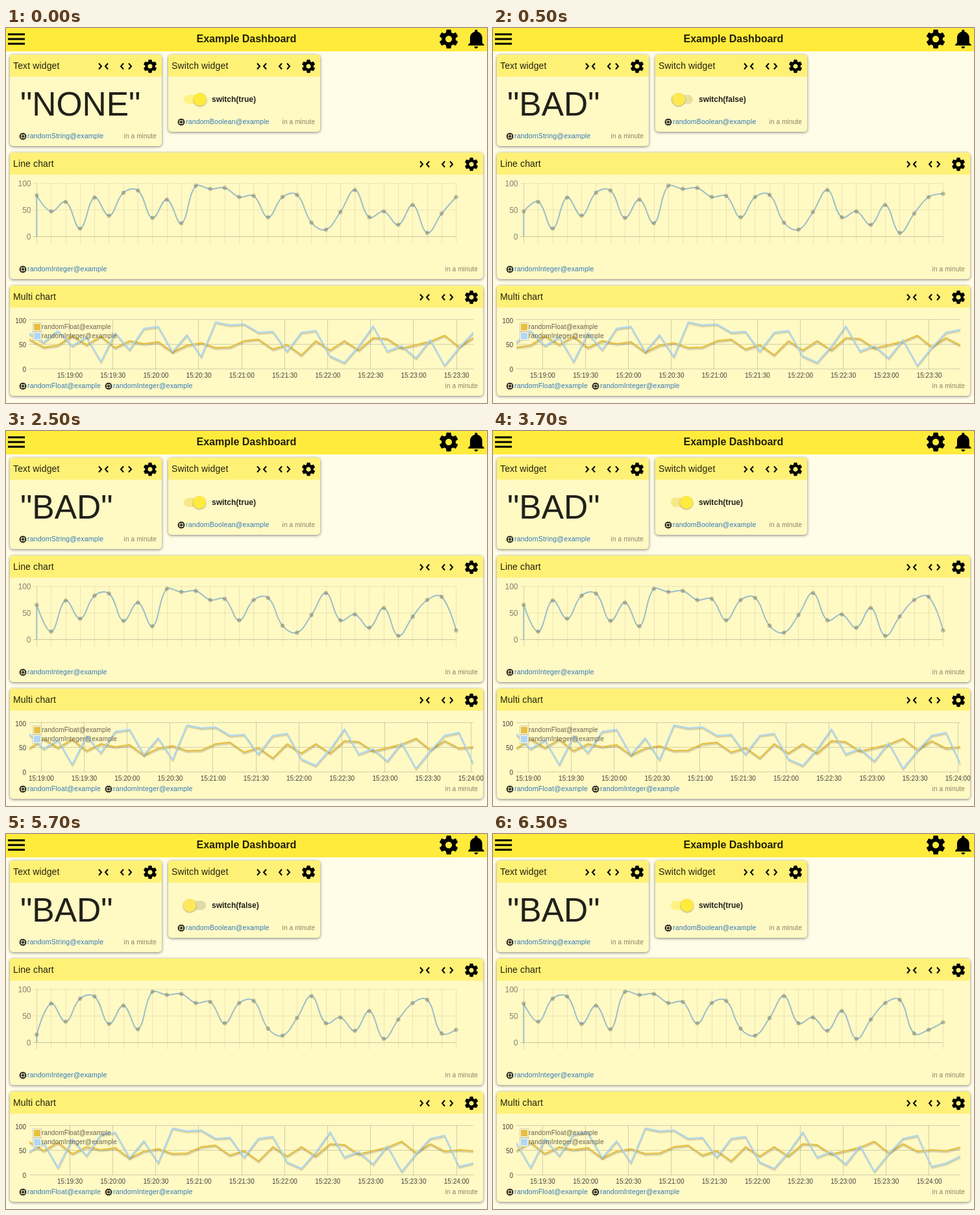
Recreate the animation shown at these times as an HTML page. Size 741 by 578 pixels, loop 8 s.

```html
<!DOCTYPE html>
<html lang="en">
<head>
<meta charset="utf-8">
<title>Example Dashboard</title>
<style>
html, body { margin: 0; width: 100%; height: 100%; overflow: hidden; background: #fffde7; }
svg { display: block; }
text { font: 14px "Liberation Sans", Arial, sans-serif; letter-spacing: .14px; fill: rgba(0,0,0,.87); white-space: pre; }
.card { filter: drop-shadow(0 1px 2px rgba(0,0,0,.5)); }
.bar { font-size: 16px; font-weight: bold; letter-spacing: 0; }
.big { font-size: 51.5px; letter-spacing: 0; }
.label { font-size: 12px; font-weight: bold; letter-spacing: 0; }
.link { font-size: 10.6px; fill: #337ab7; }
.ago { font-size: 10px; fill: rgba(0,0,0,.48); text-anchor: end; }
.scale { font-size: 12px; letter-spacing: 0; fill: #86836f; text-anchor: end; }
.tick { font-size: 10px; letter-spacing: 0; fill: #45433a; }
.legend { font-size: 10px; fill: #65624f; }
.thumb { filter: drop-shadow(0 1px 1px rgba(0,0,0,.35)); }
.line { fill: none; stroke-linejoin: round; }
</style>
</head>
<body>
<svg width="741" height="578" viewBox="0 0 741 578">
  <defs>
    <path id="menu" d="M3 18h18v-2H3zM3 13h18v-2H3zM3 6v2h18V6z"/>
    <path id="bell" d="M11.5 22c1.1 0 2-.9 2-2h-4c0 1.1.9 2 2 2zm6.5-6v-5.5c0-3.07-2.13-5.64-5-6.32V3.5c0-.83-.67-1.5-1.5-1.5S10 2.67 10 3.5v.68c-2.87.68-5 3.25-5 6.32V16l-2 2v1h17v-1z"/>
    <path id="gear" d="M19.43 12.98c.04-.32.07-.64.07-.98s-.03-.66-.07-.98l2.11-1.65c.19-.15.24-.42.12-.64l-2-3.46c-.12-.22-.39-.3-.61-.22l-2.49 1c-.52-.4-1.08-.73-1.69-.98l-.38-2.65C14.46 2.18 14.25 2 14 2h-4c-.25 0-.46.18-.49.42l-.38 2.65c-.61.25-1.17.59-1.69.98l-2.49-1c-.23-.09-.49 0-.61.22l-2 3.46c-.13.22-.07.49.12.64l2.11 1.65c-.04.32-.07.65-.07.98s.03.66.07.98l-2.11 1.65c-.19.15-.24.42-.12.64l2 3.46c.12.22.39.3.61.22l2.49-1c.52.4 1.08.73 1.69.98l.38 2.65c.03.24.24.42.49.42h4c.25 0 .46-.18.49-.42l.38-2.65c.61-.25 1.17-.59 1.69-.98l2.49 1c.23.09.49 0 .61-.22l2-3.46c.12-.22.07-.49-.12-.64zM12 15.5c-1.93 0-3.5-1.57-3.5-3.5s1.57-3.5 3.5-3.5 3.5 1.57 3.5 3.5-1.57 3.5-3.5 3.5z"/>
    <path id="chip" d="M15 9H9v6h6zm-2 4h-2v-2h2zm8-2V9h-2V7c0-1.1-.9-2-2-2h-2V3h-2v2h-2V3H9v2H7c-1.1 0-2 .9-2 2v2H3v2h2v2H3v2h2v2c0 1.1.9 2 2 2h2v2h2v-2h2v2h2v-2h2c1.1 0 2-.9 2-2v-2h2v-2h-2v-2zm-4 6H7V7h10z"/>
    <path id="arrows" d="M-97 -4.5l4 4.5l-4 4.5M-83 -4.5l-4 4.5l4 4.5M-59 -4.5l-4 4.5l4 4.5M-51 -4.5l4 4.5l-4 4.5" fill="none" stroke="#000" stroke-width="2"/>
  </defs>
  <g id="fixed"></g>
  <g id="live"></g>
</svg>
<script>
const ints = [72, 54, 77, 47, 65, 15, 73, 39, 82, 86, 35, 69, 25, 95, 89, 91, 74, 76, 36, 74, 78,
  26, 13, 46, 87, 36, 47, 22, 59, 7, 43, 74, 80, 17, 24, 38];
const floats = [60, 44, 48, 67, 49, 66, 43, 57, 51, 55, 34, 48, 53, 43, 44, 57, 60, 40, 49, 28, 57,
  38, 57, 38, 63, 61, 42, 49, 56, 68, 45, 63, 48, 51, 49, 56];
// thumb centre, thumb colour and track colour at each update
const toggles = [
  [299, '#ffeb3b', '#fff282'], [286, '#ffe94f', '#ebe19c'], [298, '#ffea3e', '#f6e886'],
  [283, '#ffe85c', '#e1dbaa'], [299, '#ffeb3b', '#fff282']];

const fixed = document.getElementById('fixed');
const live = document.getElementById('live');

const text = (x, y, s, cls = '', more = '') => `<text x="${x}" y="${y}" class="${cls}" ${more}>${s}</text>`;
const rect = (x, y, w, h, fill, more = '') =>
  `<rect x="${x}" y="${y}" width="${w}" height="${h}" fill="${fill}" ${more}/>`;
const path = (d, stroke, width = 1, more = '') =>
  `<path class="line" d="${d}" stroke="${stroke}" stroke-width="${width}" ${more}/>`;
const icon = (id, x, y, s) =>
  `<use href="#${id}" transform="translate(${x} ${y}) scale(${s}) translate(-12 -12)"/>`;
const link = (x, y, s) => icon('chip', x - 7, y - 3, .61) + text(x, y, s + '@example', 'link');

function card(x, y, w, h, title, ...names) {
  const r = x + w, base = y + h - 12;
  let at = x + 27;
  return `<g class="card">${rect(x, y, w, h, '#fff9c4', 'rx="5"')}</g>`
    + `<path d="M${x} ${y + 34}v-29q0-5 5-5h${w - 10}q5 0 5 5v29z" fill="#fff176"/>`
    + text(x + 5, y + 22, title)
    + `<use href="#arrows" x="${r}" y="${y + 18}"/>`
    + icon('gear', r - 18, y + 18, 1.03)
    + names.map(n => { const s = link(at, base, n); at += 132; return s; }).join('')
    + text(r - 8, base, 'in a minute', 'ago');
}

function lineGrid() {
  let s = '';
  for (let i = 0; i < 30; i++)
    s += path(`M${Math.round(47 + i * 22.28) + .5} 239V332`, `rgba(0,0,0,${i ? .08 : .14})`);
  [100, 50, 0].forEach((v, i) => {
    const y = 239.5 + i * 41;
    s += path(`M42 ${y}H693`, `rgba(0,0,0,${v ? .08 : .2})`) + text(38.5, y + 4.3, v, 'scale');
  });
  return s;
}

function multiGrid() {
  return [100, 50, 0].map((v, i) =>
    path(`M36 ${449.5 + i * 38}H720`, 'rgba(84,84,84,.25)')
    + text(31, 454.5 + i * 37.7, v, 'tick', 'text-anchor="end"')).join('');
}

// Spline through the points with tension .4, flat handles at both ends
function spline(p) {
  const top = 239.5, bottom = 321.5;
  const clamp = y => Math.min(bottom, Math.max(top, y));
  const handles = p.map(([x, y], i) => {
    const a = p[i - 1], b = p[i + 1];
    if (!a || !b) return [x, y, x, y];
    const da = Math.hypot(x - a[0], y - a[1]), db = Math.hypot(b[0] - x, b[1] - y);
    const ka = .4 * da / (da + db), kb = .4 - ka;
    const dx = b[0] - a[0], dy = b[1] - a[1];
    return [x - ka * dx, clamp(y - ka * dy), x + kb * dx, clamp(y + kb * dy)];
  });
  return p.map(([x, y], i) => i
    ? `C${handles[i - 1].slice(2)} ${handles[i].slice(0, 2)} ${x} ${y}`
    : `M${x} ${bottom}V${y}`).join('');
}

function lineChart(step) {
  const p = ints.slice(step + 2, step + 32).map((v, i) => [47.3 + i * 22.28, 321.5 - v * .825]);
  return path(spline(p), '#9dbfc6', 2)
    + p.map(([x, y]) =>
      `<circle cx="${x}" cy="${y}" r="3" fill="rgba(110,110,90,.4)" stroke="rgba(110,110,90,.18)"/>`).join('');
}

function series(data, step, color) {
  const d = 'M' + data.slice(step, step + 32).map((v, i) => `${36 + i * 22.065} ${525.5 - v * .76}`).join('L');
  return path(d, 'rgba(0,0,0,.1)', 3, 'transform="translate(.43 2.46)"')
    + path(d, 'rgba(0,0,0,.1)', 1.5, 'transform="translate(.3 1.72)"')
    + path(d, color, 2.2);
}

function multiChart(step) {
  let s = '';
  for (let i = 0; i < 13; i++) {
    const x = 98.3 + (i - 1) * 66.19 - step * 22.065;
    if (x < 36 || x > 720) continue;
    const time = `15:${18 + (i + 1 >> 1)}:${i % 2 ? '00' : '30'}`;
    s += path(`M${Math.floor(x) + .5} 449V526`, 'rgba(84,84,84,.25)')
      + text(x + .2, 539, time, 'tick', 'text-anchor="middle"');
  }
  s += `<svg x="36" y="440" width="684" height="95" viewBox="36 440 684 95">`
    + series(floats, step, '#e8c040') + series(ints, step, '#afd8f0') + '</svg>';
  [['#e8c040', 'randomFloat'], ['#afd8f8', 'randomInteger']].forEach(([color, name], i) => {
    const y = 455 + i * 14;
    s += rect(41.5, y - .5, 13, 13, '#fffbe0', 'stroke="#d2cfb0"')
      + rect(43, y + 1, 10, 10, color) + text(55, y + 9.3, name + '@example', 'legend');
  });
  return s;
}

function toggle(step) {
  const [x, thumb, track] = toggles[step];
  return rect(274, 103, 34, 14, track, 'rx="7"')
    + `<circle class="thumb" cx="${x}" cy="110" r="10" fill="${thumb}"/>`
    + text(317, 114, `switch(${step % 2 === 0})`, 'label');
}

fixed.innerHTML = rect(0, 0, 741, 36, '#ffeb3b')
  + icon('menu', 16, 17, 1.444) + icon('gear', 682, 17, 1.444) + icon('bell', 725, 17, 1.444)
  + text(293.5, 22, 'Example Dashboard', 'bar')
  + card(6, 41, 234, 141, 'Text widget', 'randomString')
  + card(250, 41, 234, 119, 'Switch widget', 'randomBoolean')
  + card(6, 192, 729, 195, 'Line chart', 'randomInteger')
  + card(6, 397, 729, 170, 'Multi chart', 'randomFloat', 'randomInteger')
  + lineGrid() + multiGrid();

let shown = -1;
function draw() {
  const step = Math.floor((performance.now() % 8000 + 1500) / 2000);
  if (step !== shown) {
    shown = step;
    live.innerHTML = text(22, 135, step ? '"BAD"' : '"NONE"', 'big')
      + toggle(step) + lineChart(step) + multiChart(step);
  }
  requestAnimationFrame(draw);
}
draw();
</script>
</body>
</html>
```
